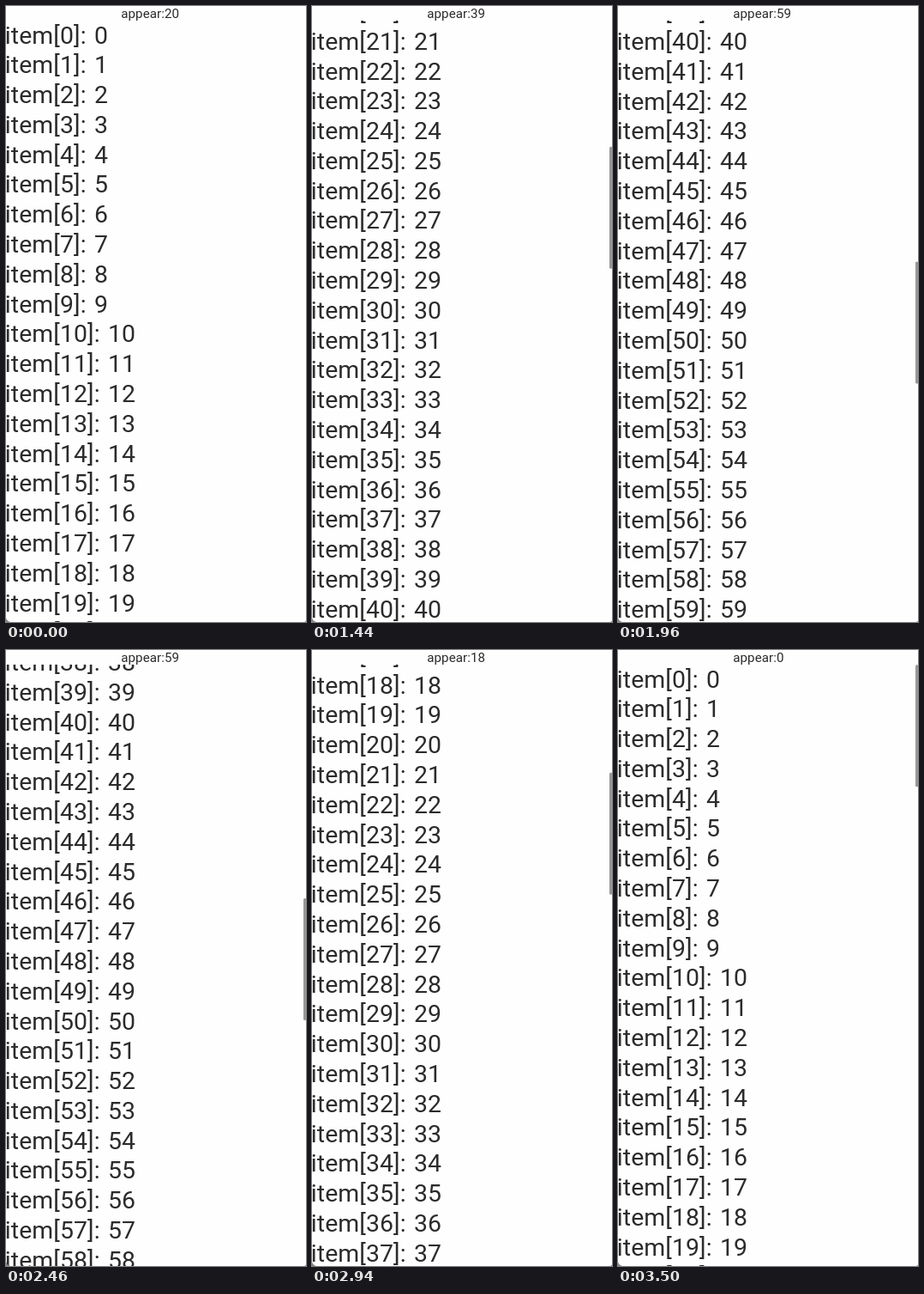
Animation, 350 px wide and 717 px high, one loop 5330 ms. Source, as an HTML page:

```html
<!DOCTYPE html>
<html lang="en">
<head>
<meta charset="utf-8">
<title>Scrolling list</title>
<style>
  html, body { margin: 0; width: 100%; height: 100%; overflow: hidden; background: #fefefe; }
  svg { display: block; width: 350px; height: 717px; }
  text { font-family: Roboto, "Noto Sans", sans-serif; fill: #2b2b2b; letter-spacing: .1px; white-space: pre; }
  #rows { font-size: 28.4px; word-spacing: 2.2px; }
  #label { font-size: 15.1px; }
</style>
</head>
<body>
<svg viewBox="0 0 350 717">
  <clipPath id="view"><rect y="17" width="350" height="700"/></clipPath>
  <rect width="350" height="717" fill="#fefefe"/>
  <text id="label" x="134.2" y="14"></text>
  <g clip-path="url(#view)"><g id="rows"></g></g>
  <rect id="bar" x="347" width="3.4" height="142" rx="1.5" fill="#979797"/>
  <path d="M0 712Q1 716 5 717H0ZM350 715.5V717H347.5Q349.5 716.8 350 715.5Z" fill="#858585"/>
</svg>
<script>
const LOOP = 5330, STEP = 40;
const TOP = 17, VIEW = 700, PITCH = 34.79, BASE = 43.5;
const TURN = 2460;

// Each swipe: start time, number of steps, scroll offset it aims for.
// The last one runs into the top of the list.
const swipes = [
  [1000, 6, 468], [1360, 6, 913], [1720, 7, 1384],
  [TURN, 6, 980], [2780, 7, 555], [3100, 7, 145], [3420, 7, -270]
];

const $ = id => document.getElementById(id);
const label = $('label'), bar = $('bar');
const rows = Array.from({ length: 22 }, () => {
  const row = document.createElementNS('http://www.w3.org/2000/svg', 'text');
  row.setAttribute('x', -1.2);
  return $('rows').appendChild(row);
});

const ease = u => Math.sin(Math.PI / 2 * u ** .87) ** 2;

function scrollAt(time, lag = 0) {
  let offset = 0;
  for (const [start, steps, end] of swipes) {
    if (time < start) break;
    const step = Math.floor((time - start) / STEP) + 1 - lag;
    offset += (end - offset) * ease(Math.min(1, step / steps));
  }
  return Math.max(0, offset);
}

// Index of the row that came into view last; it trails the scroll by half a step
function lastAppeared(time) {
  const offset = scrollAt(time, .5);
  if (time < TURN) return Math.floor((offset + VIEW) / PITCH);
  const first = Math.floor(offset / PITCH);
  return first < 39 ? first : 59;
}

function draw(time) {
  const offset = scrollAt(time);
  const first = Math.floor(offset / PITCH);
  rows.forEach((row, n) => {
    const i = first + n;
    const text = `item[${i}]: ${i}`;
    if (row.textContent !== text) row.textContent = text;
    row.setAttribute('y', BASE + i * PITCH - offset);
  });
  label.textContent = 'appear:' + lastAppeared(time);
  const fade = Math.floor((time - 1000) / STEP);
  bar.setAttribute('y', TOP + .3 + offset * .2025);
  bar.setAttribute('opacity', fade < 0 ? 0 : Math.min(1, .13 + fade * .25));
}

const begin = performance.now();
function tick() {
  draw((performance.now() - begin) % LOOP);
  requestAnimationFrame(tick);
}
tick();
</script>
</body>
</html>
```
